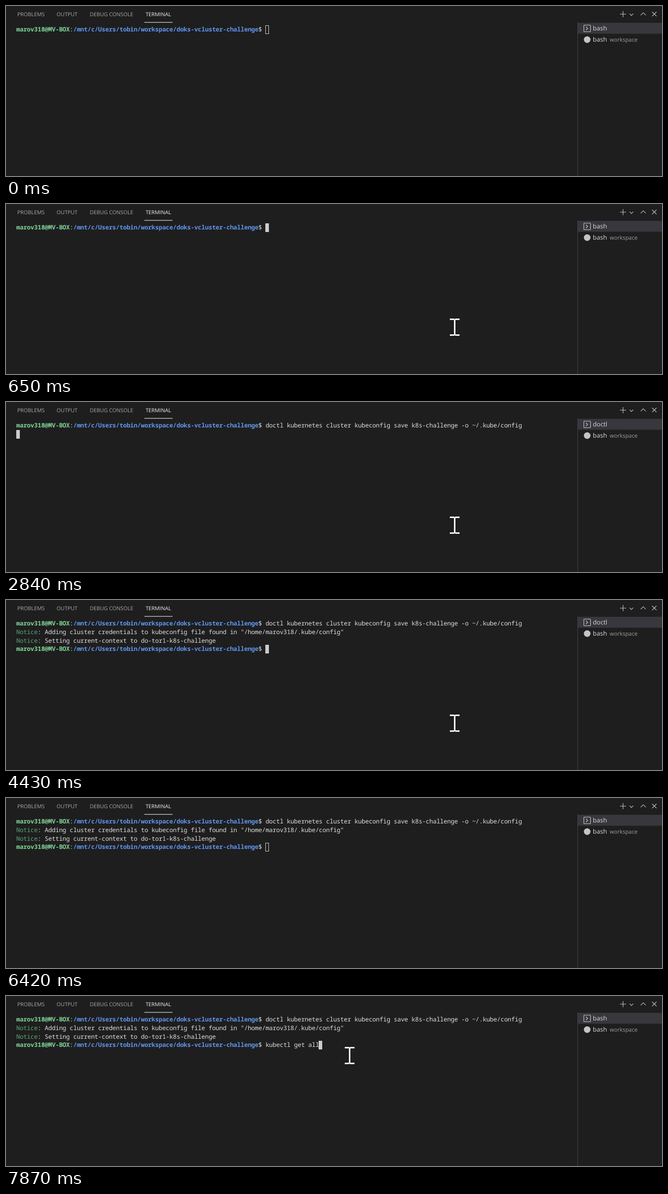
Write an HTML page that moves like this. It is 1280 px wide and 334 px high and loops after 8000 ms.

```html
<!DOCTYPE html>
<html lang="en">
<head>
<meta charset="utf-8">
<title>Terminal</title>
<style>
  html, body { margin: 0; width: 100%; height: 100%; overflow: hidden; background: #1e1e1e; }
  svg { display: block; }
  text { white-space: pre; text-rendering: geometricPrecision; }
  .tab { font: 10.35px "Open Sans", "Noto Sans", sans-serif; fill: #a8a8a8; }
  .tab.on { fill: #f0f0f0; }
  .item { font: 12.25px "Open Sans", "Noto Sans", sans-serif; fill: #dadada; }
  .hint { font-size: 10.9px; fill: #a0a0a0; }
  .term { font: 500 12px "Noto Sans Mono", "DejaVu Sans Mono", monospace; letter-spacing: -0.252px; fill: #dedede; }
  .user { font-weight: 700; fill: #80d698; }
  .path { font-weight: 700; fill: #6094ee; }
  .note { fill: #5ba476; }
  .icon { fill: none; stroke: #c8c8c8; stroke-width: 1.1; }
</style>
</head>
<body>
<svg width="1280" height="334" viewBox="0 0 1280 334">
  <rect width="1280" height="334" fill="#1e1e1e"/>
  <text class="tab" x="21.9" y="20.4">PROBLEMS</text>
  <text class="tab" x="98.8" y="20.4">OUTPUT</text>
  <text class="tab" x="163.4" y="20.4">DEBUG CONSOLE</text>
  <text class="tab on" x="272.4" y="20.4">TERMINAL</text>
  <rect x="270" y="31.6" width="55" height="1.1" fill="#e7e7e7"/>

  <rect x="1116" y="33" width="164" height="21.5" fill="#37373d"/>
  <rect x="1115" y="32" width="1" height="302" fill="#434343"/>
  <g class="icon">
    <path d="M1198 16h12M1204 10v12"/>
    <path d="M1216.8 15.2l3.5 3.5 3.5-3.5"/>
    <path d="M1238.5 18.2l4.9-5 4.9 5"/>
    <path d="M1260.7 11.5l8.6 8.6M1269.3 11.5l-8.6 8.6"/>
    <rect x="1127.5" y="37.5" width="13" height="13" rx="1"/>
    <path d="M1131.5 40.5l3.5 3.5-3.5 3.5"/>
  </g>
  <circle cx="1134" cy="66" r="6.5" fill="#c5c5c5"/>
  <text class="item" id="job" x="1145" y="48.4"></text>
  <text class="item" x="1145" y="70.4">bash</text>
  <text class="item hint" x="1178" y="70.4">workspace</text>

  <g id="lines"></g>
  <rect id="caret" stroke="#cccccc"/>
  <path id="beam" fill="#f0f0f0" d="M-9.5-17h8l1.5 1 1.5-1h8v3h-8v28h8v3h-8l-1.5-1-1.5 1h-8v-3h8v-28h-8z"/>
  <path id="arrow" fill="#ffffff" stroke="#000000" d="M0 0v27l6-6 4.5 10 4.5-2-4.5-9.5h8.5z"/>
</svg>
<script>
const LOOP = 8000, LEFT = 20, CHAR = 6.948;
const byId = id => document.getElementById(id);
const [job, lines, caret, beam, arrow] = ["job", "lines", "caret", "beam", "arrow"].map(byId);

const user = "marov318";
const host = user + "@MV-BOX";
const dir = "/mnt/c/Users/tobin/workspace/doks-vcluster-challenge";
const promptLen = (host + ":" + dir + "$ ").length;
const saveCmd = "doctl kubernetes cluster kubeconfig save k8s-challenge -o ~/.kube/config";
const listCmd = "kubectl get all";

const span = (cls, text) => `<tspan class="${cls}">${text}</tspan>`;
const prompt = cmd => span("user", host) + ":" + span("path", dir) + "$ " + cmd;
const notice = text => span("note", "Notice") + ": " + text;

function content(t) {
  const rows = [prompt(t < 1440 ? "" : saveCmd)];
  if (t >= 4430) rows.push(
    notice(`Adding cluster credentials to kubeconfig file found in "/home/${user}/.kube/config"`),
    notice("Setting current-context to do-tor1-k8s-challenge"),
    prompt(t < 7870 ? "" : listCmd));
  return rows.map((row, i) =>
    `<text class="term" x="${LEFT}" y="${50.2 + 16.75 * i}">${row}</text>`).join("");
}

// column, row and whether the terminal has focus
function caretAt(t) {
  if (t < 1440) return [promptLen, 0, t >= 650];
  if (t < 2760) return [promptLen + saveCmd.length, 0, true];
  if (t < 4430) return [0, 1, true];
  if (t < 7870) return [promptLen, 3, t < 6420 || t >= 7470];
  return [promptLen + listCmd.length, 3, true];
}

// pointer stops: time, x, y
const leaving = [[4900, 850.5, 215], [4960, 785.5, 150], [5020, 693.5, 72]];
const coming = [[7140, 686.5, 44], [7200, 676.5, 97], [7270, 670.5, 125], [7350, 668.5, 114],
  [7410, 669.5, 114], [7470, 670.5, 114], [7610, 670.5, 115], [7670, 670.5, 117]];
const lastStop = (stops, t) => stops.filter(s => s[0] <= t).pop().slice(1);

function pointerAt(t) {
  if (t < 70 || (t >= 5080 && t < 7140)) return null;
  if (t >= 7140) return lastStop(coming, t);
  if (t >= 4900) return lastStop(leaving, t);
  const step = Math.min(9, Math.floor((t - 70) / 64.4 + 1e-6));
  const rest = (1 - step / 9) ** 2;
  return [875.5 + 288 * rest, 242 + 80 * rest];
}

function show(el, pos) {
  el.style.display = pos ? "" : "none";
  if (pos) el.setAttribute("transform", `translate(${pos})`);
}

let shown = "";
function draw(t) {
  const html = content(t);
  if (html !== shown) lines.innerHTML = shown = html;
  job.textContent = t >= 2840 && t < 4570 ? "doctl" : "bash";

  const [col, row, focus] = caretAt(t);
  const attrs = {
    x: Math.floor(LEFT + col * CHAR) + 0.5, y: Math.round(38 + 16.7 * row) + 0.5,
    width: 6, height: 16, fill: focus ? "#cccccc" : "none"
  };
  for (const name in attrs) caret.setAttribute(name, attrs[name]);

  const pos = pointerAt(t), onSide = pos && pos[0] > 1116;
  show(beam, onSide ? null : pos);
  show(arrow, onSide ? pos : null);
}

const start = performance.now();
function tick(now) {
  draw(Math.max(0, now - start) % LOOP);
  requestAnimationFrame(tick);
}
draw(0);
requestAnimationFrame(tick);
</script>
</body>
</html>
```
